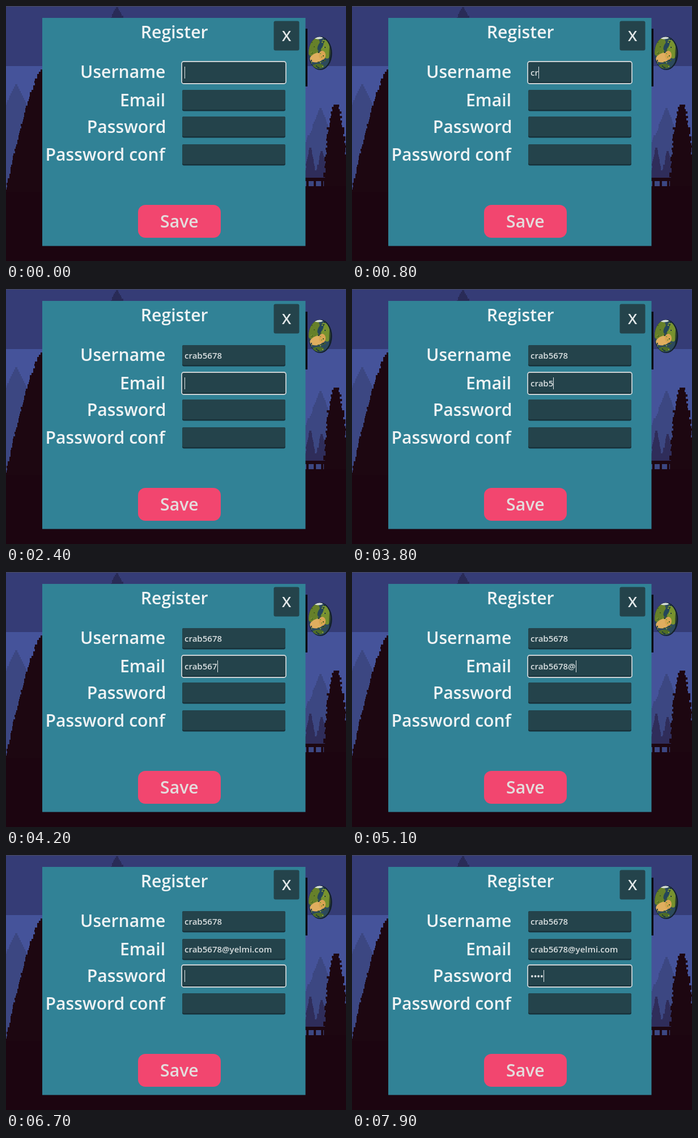
Write an HTML page with a canvas that moves like this. It is 600x450 px and loops after 8 s.

```html
<!DOCTYPE html>
<html lang="en">
<head>
<meta charset="utf-8">
<title>Register form</title>
<style>
  html, body { margin: 0; width: 100%; height: 100%; overflow: hidden; background: #1c0510; }
  canvas, svg { position: absolute; left: 0; top: 0; width: 600px; height: 450px; display: block; }
  text { font-family: "Open Sans", "Noto Sans", sans-serif; font-weight: 600; white-space: pre; }
  .label { font-size: 30.2px; fill: #f0f3f4; }
  .entry { font-size: 15.05px; fill: #d9dfe0; }
</style>
</head>
<body>
<canvas id="scene" width="600" height="450"></canvas>
<svg id="ui" viewBox="0 0 600 450">
  <rect x="64" y="21" width="464.5" height="402.5" fill="#318296"/>
  <text class="label" x="237.7" y="57">Register</text>
  <rect x="472.5" y="26.5" width="45" height="52" rx="3" fill="#24434b"/>
  <text x="495" y="61.5" text-anchor="middle" font-size="26" fill="#e3e8e9">X</text>
  <rect x="233" y="351" width="146" height="58" rx="13" fill="#f2466f"/>
  <text class="label" x="305.9" y="391" text-anchor="middle" style="fill:#e4dcdc">Save</text>
</svg>
<script>
const LOOP = 8000;
const USER = "crab5678";
const MAIL = USER + "@yelmi.com";

// label, label x, label baseline, field top, value, key times
const rows = [
  ["Username", 131, 126.5, 99, USER, [700, 800, 1000, 1100, 1400, 1600, 1800, 2100]],
  ["Email", 201, 177, 148, MAIL, [3000, 3100, 3200, 3400, 3800, 4000, 4200, 4600, 5100,
    5300, 5400, 5600, 5700, 5900, 6100, 6200, 6300, 6500]],
  ["Password", 142.7, 224, 195, "••••", [7200, 7400, 7500, 7600]],
  ["Password conf", 69.5, 272.5, 244, "", []],
];
const focusTimes = [0, 2300, 6600];

const ui = document.getElementById("ui");
function add(tag, attrs, content = "") {
  const el = document.createElementNS("http://www.w3.org/2000/svg", tag);
  for (const k in attrs) el.setAttribute(k, attrs[k]);
  el.textContent = content;
  return ui.appendChild(el);
}

const entries = rows.map(([label, x, base, top]) => {
  add("text", { class: "label", x, y: base }, label);
  add("rect", { x: 311, y: top, width: 182, height: 37.5, rx: 3, fill: "#18313a" });
  add("rect", { x: 311, y: top, width: 182, height: 35, rx: 2.5, fill: "#24434b" });
  return add("text", { class: "entry", x: 315, y: top + 24.3 });
});
const ring = add("rect", { x: 310, width: 184, height: 39, rx: 3.5, fill: "none",
  stroke: "#cbd2d4", "stroke-width": 1.8 });
const caret = add("rect", { width: 1, height: 21, fill: "#e4e9ea" });

function drawScene() {
  const g = document.getElementById("scene").getContext("2d");
  const box = (c, x, y, w, h) => { g.fillStyle = c; g.fillRect(x, y, w, h); };
  let seed = 11;
  const rand = () => (seed = (seed * 16807) % 2147483647) / 2147483647;
  const along = (pts, y) => {
    const i = Math.max(1, pts.findIndex(p => p[0] >= y));
    const [a, b] = [pts[i - 1], pts[i]];
    return a[1] + (b[1] - a[1]) * (y - a[0]) / (b[0] - a[0]);
  };
  // Blocky pixel-art peak: half width grows with depth
  const peak = (c, x, y0, y1, spread, step = 4) => {
    for (let y = y0; y < y1; y += step) {
      const d = (y - y0) / (y1 - y0);
      const l = Math.round(2 + spread * d + rand() * 4 * d);
      const r = Math.round(2 + spread * d + rand() * 4 * d);
      box(c, x - l, y, l + r, step);
    }
  };
  const SKY = "#45539a", FAR = "#3c4782", DARK = "#1d0711", GROUND = "#1c0510";

  box("#353c76", 0, 0, 600, 106);
  box(SKY, 0, 106, 600, 244);
  box("#4a4c5e", 0, 0, 600, 1);
  peak("#292b57", 196, 2, 22, 9, 3);

  // Left slopes
  peak(FAR, 18, 138, 210, 34);
  box(FAR, 0, 210, 60, 120);
  const near = [[112, 62], [118, 57], [138, 51], [152, 45], [176, 38], [202, 30],
    [232, 22], [258, 16], [286, 10], [306, 5], [328, 0]];
  for (let y = 112; y < 328; y += 4) {
    const x = Math.max(0, Math.round(along(near, y) - rand() * 3));
    box(DARK, x, y, 64 - x, 4);
  }

  // Right slopes, pines and bridge
  peak(FAR, 555, 180, 240, 22);
  box(FAR, 528, 240, 72, 100);
  peak("#2f2d5a", 537, 250, 304, 8);
  peak("#2f2d5a", 557, 256, 304, 8);
  const pine = [[174, 2], [184, 6], [206, 8], [214, 12], [250, 15], [280, 17], [352, 22]];
  for (let y = 174; y < 350; y += 4) {
    const w = along(pine, y), l = Math.round(w + rand() * 4), r = Math.round(w + rand() * 4);
    box(DARK, 582 - l, y, l + r, 4);
  }
  box(DARK, 528, 303, 72, 6);
  for (let x = 530; x < 570; x += 13) box(DARK, x, 309, 4, 10);
  box(GROUND, 0, 328, 66, 122);
  box(GROUND, 526, 318, 74, 132);
  box(GROUND, 0, 423, 600, 27);

  // Globe beside its post
  box("#0b0a12", 528, 40, 4, 102);
  const oval = (c, x, y, rx, ry, a = 0) => {
    g.fillStyle = c;
    g.beginPath();
    g.ellipse(x, y, rx, ry, a, 0, Math.PI * 2);
    g.fill();
  };
  oval("#14202a", 554.5, 83.5, 21, 29.5);
  g.save();
  g.beginPath();
  g.ellipse(553.5, 83, 19.5, 28.5, 0, 0, Math.PI * 2);
  g.clip();
  box("#2c4a5c", 530, 50, 50, 66);
  oval("#66802a", 543, 72, 10, 17, 0.3);
  oval("#77922f", 564, 76, 8, 17, -0.2);
  oval("#e0ae5f", 549, 91, 13, 8, -0.3);
  oval("#d9a552", 558, 87, 6, 8);
  oval("#d7dfd8", 551, 56, 8, 2.5);
  oval("#25465a", 555, 70, 4, 9, 0.5);
  oval("#4f6d27", 551, 106, 10, 4);
  for (let i = 0; i < 34; i++) {
    const c = ["#435f20", "#8aa03a", "#1c3440"][i % 3];
    box(c, Math.round(534 + rand() * 40), Math.round(57 + rand() * 52), 2, 2);
  }
  oval("rgba(12,22,30,.55)", 575, 87, 5, 25);
  g.restore();
}

function render(t) {
  const active = focusTimes.filter(f => f <= t).length - 1;
  rows.forEach((row, i) => {
    const shown = row[4].slice(0, row[5].filter(k => k <= t).length);
    if (entries[i].textContent !== shown) entries[i].textContent = shown;
  });
  const top = rows[active][3];
  const el = entries[active];
  const width = el.textContent ? el.getComputedTextLength() : 0;
  ring.setAttribute("y", top - 1);
  caret.setAttribute("x", Math.round(315 + width));
  caret.setAttribute("y", top + 8);
}

drawScene();
const start = performance.now();
function tick() {
  render((performance.now() - start) % LOOP);
  requestAnimationFrame(tick);
}
tick();
</script>
</body>
</html>
```
